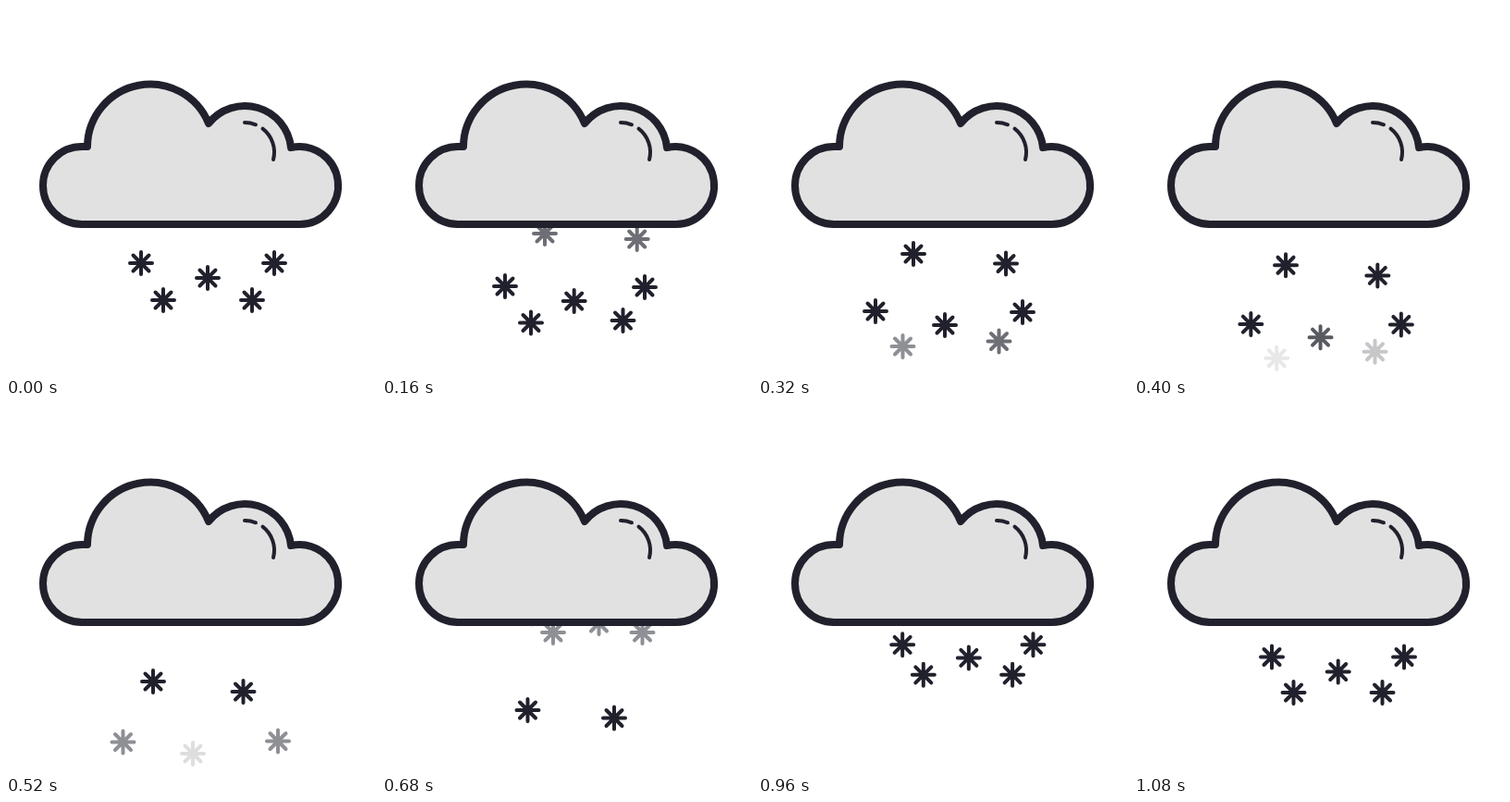
An HTML page that plays this animation: 400 px wide and 400 px high, repeating every 1120 ms.

```html
<!DOCTYPE html>
<html lang="en">
<head>
<meta charset="utf-8">
<title>Snow cloud</title>
<style>
  html, body { margin: 0; height: 100%; overflow: hidden; background: #fff; }
  svg { display: block; width: 100%; height: 100%; }
</style>
</head>
<body>
<svg viewBox="0 0 400 400" fill="none" stroke="#20212c" stroke-width="4" stroke-linecap="round" stroke-linejoin="round">
  <defs>
    <path id="flake" d="M-12 0H12M0-12V12M-8.5-8.5L8.5 8.5M-8.5 8.5L8.5-8.5"/>
  </defs>
  <g id="snow"></g>
  <path fill="#e1e1e1" stroke-width="8" d="M82 236A42 42 0 0 1 82 152H88A68 68 0 0 1 219 127A50 50 0 0 1 308 153A42 42 0 1 1 318 236Z"/>
  <path d="M258 126A32 32 0 0 1 270 128.3M277.5 132.7A32 32 0 0 1 289 166"/>
</svg>
<script>
const LOOP = 1120, STEP = 40, FADE = 200;
const outer = [680, 840, 1080, 1120, 1280, 1440, 1640];
const inner = [160, 320, 520, 680, 840];

// Each flake: birth and death times, key times, path of x and y
const flakes = [
  { birth: 670, death: 1740, times: outer,
    x: [163, 162, 149, 146, 133, 127, 126.5], y: [228, 247, 273.5, 278, 303, 330, 365.5] },
  { birth: 580, death: 1540, times: outer,
    x: [185, 184, 172.5, 170, 161, 156.5], y: [247, 273.5, 312, 318, 342.5, 368] },
  { birth: 580, death: 1670, times: outer,
    x: [234.5, 233.7, 220.7, 218, 207.7, 202, 202], y: [237, 259, 289.5, 294, 319, 345, 378] },
  { birth: 580, death: 1570, times: outer,
    x: [281.5, 280.5, 268.5, 266, 260.5, 260.5], y: [247, 273.5, 312, 318, 340, 362.5] },
  { birth: 670, death: 1740, times: outer,
    x: [303, 302, 292, 290, 284, 286, 294], y: [228, 247, 273.5, 278, 304, 331, 364.5] },
  { birth: 30, death: 940, times: inner,
    x: [176, 168, 159, 157.5, 160], y: [246, 268, 300, 331, 363] },
  { birth: 30, death: 940, times: inner,
    x: [275.7, 268, 256.5, 251, 254], y: [252, 278.5, 311, 339.5, 368.5] }
];

const snow = document.getElementById("snow");
for (const f of flakes) {
  f.node = document.createElementNS("http://www.w3.org/2000/svg", "use");
  f.node.setAttribute("href", "#flake");
  snow.append(f.node);
}

const clamp = v => Math.max(0, Math.min(1, v));

// Smooth curve through the keys, straight beyond both ends
function curve(times, p, t) {
  const last = p.length - 1;
  const slope = i => {
    const a = Math.max(0, i - 1), b = Math.min(last, i + 1);
    return (p[b] - p[a]) / (times[b] - times[a]);
  };
  if (t <= times[0]) return p[0] + slope(0) * (t - times[0]);
  if (t >= times[last]) return p[last] + slope(last) * (t - times[last]);
  let i = 0;
  while (t > times[i + 1]) i++;
  const d = times[i + 1] - times[i], u = (t - times[i]) / d, v = 1 - u;
  return v * v * (1 + 2 * u) * p[i] + u * u * (1 + 2 * v) * p[i + 1]
    + d * u * v * (v * slope(i) - u * slope(i + 1));
}

function draw(now) {
  const time = Math.floor(now % LOOP / STEP) * STEP;
  for (const { birth, death, times, x, y, node } of flakes) {
    const t = time < birth ? time + LOOP : time;
    const alpha = Math.min(clamp((t - birth) / FADE), clamp((death - t) / FADE));
    node.setAttribute("opacity", alpha);
    node.setAttribute("transform", `translate(${curve(times, x, t)} ${curve(times, y, t)})`);
  }
}

const start = performance.now();
function tick() {
  draw(performance.now() - start);
  requestAnimationFrame(tick);
}
tick();
</script>
</body>
</html>
```
